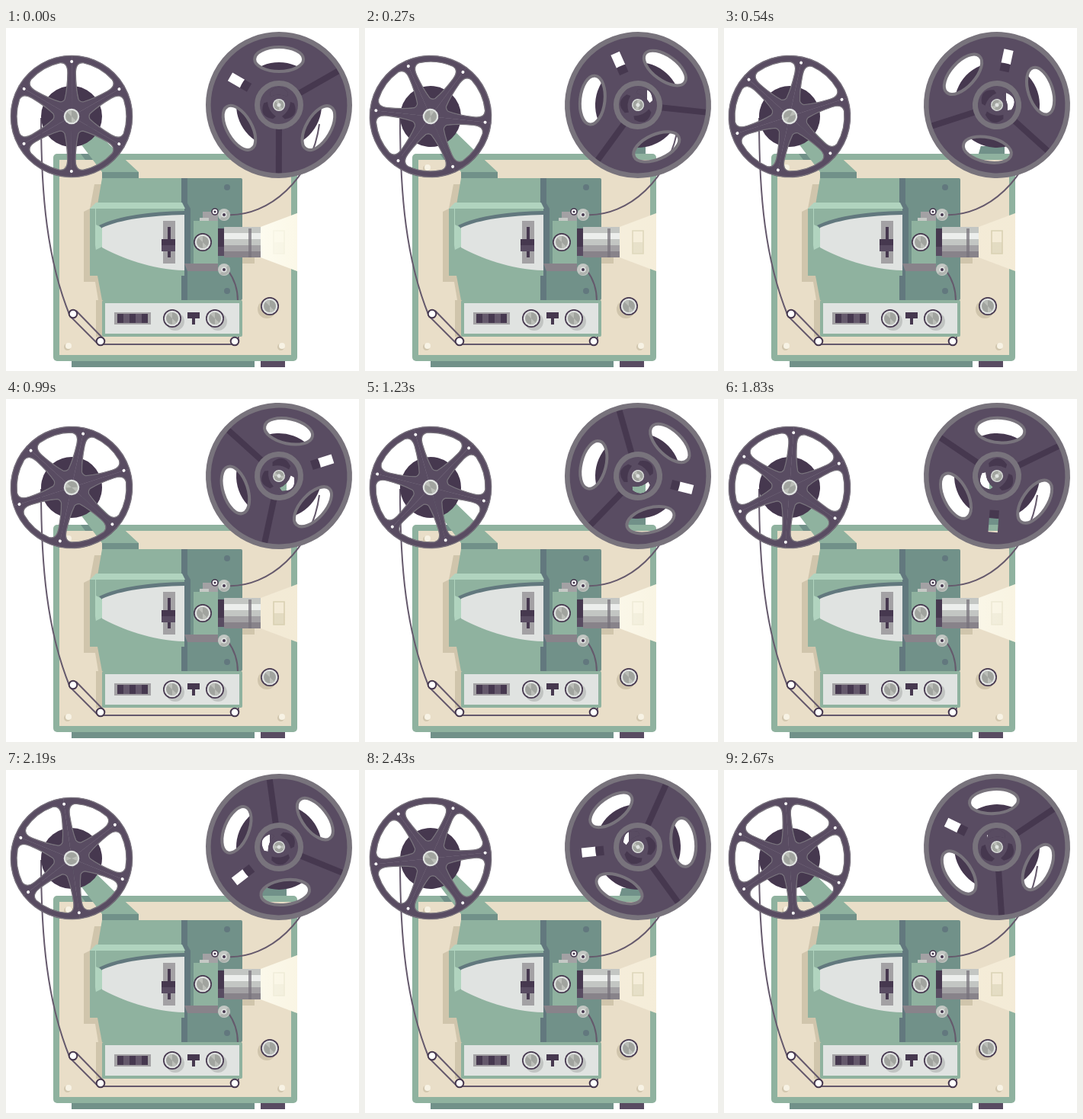
Write an HTML page that moves like this. It is 463 by 450 pixels and loops after 2700 ms.

```html
<!DOCTYPE html>
<html lang="en">
<head>
<meta charset="utf-8">
<title>Film projector</title>
<style>
  html, body { margin: 0; width: 100%; height: 100%; overflow: hidden; background: #fff; }
  svg { display: block; width: 463px; height: 450px; }
</style>
</head>
<body>
<svg id="stage" viewBox="0 0 463 450">
  <defs>
    <linearGradient id="glow">
      <stop offset="0" stop-color="#fffff4"/>
      <stop offset="1" stop-color="#fffef0" stop-opacity=".82"/>
    </linearGradient>
    <g id="face">
      <circle r="9.5" fill="#e0e3e1"/>
      <circle r="8" fill="#a1a49f"/>
      <path d="M0 0L-5.6-5.6A8 8 0 0 1 0-8ZM0 0L5.6 5.6A8 8 0 0 1 0 8Z" fill="#bbbeb8"/>
    </g>
    <g id="knob">
      <circle r="12" fill="#46384f"/>
      <circle r="10.3" fill="#e0e3e1"/>
      <use href="#face"/>
    </g>
    <g id="guide">
      <circle r="8" fill="#c3c7c3"/>
      <path d="M-5.6 5.6A8 8 0 0 0 5.6-5.6Z" fill="#aeb2ae"/>
      <circle r="3.6" fill="#e0e3e1"/>
      <circle r="2" fill="#46384f"/>
    </g>
    <circle id="pin" r="5.3" fill="#fff" stroke="#46384f" stroke-width="2"/>
    <g id="bolt">
      <circle cx="-1.5" cy="1.5" r="4.5" fill="#d1c6ae"/>
      <circle r="4" fill="#f7f2e4"/>
    </g>
  </defs>

  <!-- stand behind the right reel -->
  <path d="M334 165L337 155H348V101H368V165Z" fill="#8fb29f"/>
  <path d="M334 165L337 155H368V165Z" fill="#719189"/>
  <path d="M346 72H370V96H346Z" fill="#594c62"/>

  <!-- case -->
  <path d="M86 436H326V445H86Z" fill="#719189"/>
  <path d="M334 436H366V445H334Z" fill="#594c62"/>
  <rect x="62" y="165" width="320" height="272" rx="5" fill="#8fb29f"/>
  <path d="M70 173H374V429H70Z" fill="#e9dec8"/>
  <use href="#bolt" x="82" y="183"/>
  <use href="#bolt" x="82" y="417"/>
  <use href="#bolt" x="362" y="417"/>

  <!-- housing -->
  <path d="M124 205H116L110 237L102 241V333H117L121 357H118V405H130V205ZM306 301H326V309H306Z" fill="#d0c5ac"/>
  <path d="M98 165H120V173H104Z" fill="#719189"/>
  <path d="M80 128L98 152L126 189H174L146 163L110 128Z" fill="#8fb29f"/>
  <path d="M126 189H174V198H126Z" fill="#719189"/>
  <path d="M126 197H232V357H126L120 325V232Z" fill="#8fb29f"/>
  <rect x="230" y="197" width="80" height="160" rx="2" fill="#719189"/>
  <path d="M230 197H238V230L242 237V319H238V357H230Z" fill="#62787e"/>
  <path d="M110 237L118 229H231L235 237Z" fill="#b1d4bf"/>
  <path d="M110 237H234V325H110Z" fill="#8fb29f"/>
  <path d="M110 237H118V258L126 262V287L118 291V292Z" fill="#b1d4bf"/>
  <path d="M110 237H117V325H110Z" fill="#8fb29f"/>
  <path d="M122 259C148 246 190 241 234 240V248L126 263Z" fill="#62787e"/>
  <path d="M126 262C150 251 190 246 234 245V318C190 317 150 301 126 288Z" fill="#e0e3e1"/>
  <path d="M206 253H222V309H206Z" fill="#a3a1a4"/>
  <path d="M212 261H216V301H212ZM204 277H222V285H204Z" fill="#46384f"/>
  <path d="M204 285H222V293H204Z" fill="#594c62"/>
  <path d="M212 293H216V301H212Z" fill="#46384f"/>
  <path d="M234 309H278V319H238Z" fill="#88838a"/>
  <path d="M258 241H278V253H258Z" fill="#a3a1a4"/>
  <path d="M254 249H266V254H254Z" fill="#c5c9c5"/>
  <path d="M246 253H278V309H246Z" fill="#8fb29f"/>
  <circle cx="290" cy="209" r="4" fill="#62787e"/>
  <circle cx="290" cy="345" r="4" fill="#62787e"/>
  <use href="#knob" x="258" y="281"/>

  <!-- film -->
  <g fill="none" stroke="#65596c" stroke-width="2">
    <path d="M46 118C46 220 54 305 84 378L120 414M92 371L128 408"/>
    <path d="M290 245C345 248 402 197 411 126"/>
    <path d="M291 318C300 330 304 342 304 358"/>
  </g>

  <!-- control panel -->
  <rect x="126" y="357" width="184" height="48" rx="2" fill="#8fb29f"/>
  <path d="M130 361H306V401H130Z" fill="#e0e3e1"/>
  <path d="M142 373H190V389H142Z" fill="#a3a1a4"/>
  <path d="M146 375H186V387H146Z" fill="#46384f"/>
  <path d="M154 375H162V387H154ZM170 375H178V387H170Z" fill="#65596c"/>
  <circle cx="222" cy="385" r="12" fill="#c1c4c2"/>
  <circle cx="278" cy="385" r="12" fill="#c1c4c2"/>
  <use href="#knob" x="218" y="381"/>
  <use href="#knob" x="274" y="381"/>
  <path d="M238 373H254V381H238ZM244 381H248V389H244Z" fill="#46384f"/>
  <circle cx="342" cy="369" r="12" fill="#d0c5ac"/>
  <use href="#knob" x="346" y="365"/>
  <path d="M123 415H300Q304 415 305 405" fill="none" stroke="#65596c" stroke-width="2"/>
  <use href="#pin" x="88" y="375"/>
  <use href="#pin" x="124" y="411"/>
  <use href="#pin" x="300" y="411"/>

  <!-- lens and rollers -->
  <path d="M278 263H286V299H278Z" fill="#46384f"/>
  <path d="M278 287H286V299H278Z" fill="#594c62"/>
  <path d="M286 261H334V301H286Z" fill="#c3c6c3"/>
  <path d="M286 269H334V277H286Z" fill="#eceeec"/>
  <path d="M286 285H334V293H286Z" fill="#a3a1a4"/>
  <path d="M286 293H334V301H286Z" fill="#88838a"/>
  <path d="M318 263H322V301H318Z" fill="#77727b" opacity=".75"/>
  <use href="#guide" x="286" y="245"/>
  <use href="#guide" x="286" y="317"/>
  <circle cx="274" cy="241" r="4" fill="#fff" stroke="#46384f" stroke-width="1.6"/>
  <circle cx="274" cy="241" r="1.6" fill="#46384f"/>

  <!-- beam -->
  <path d="M334 261L382 243V319L334 301Z" fill="#f3ead5"/>
  <path d="M351 281H365V296H351Z" fill="#e2dac0"/>
  <path d="M351 266H365V296H351Z" fill="none" stroke="#d8cfb0" stroke-width="1.6"/>
  <path id="beam" d="M334 261L382 243V319L334 301Z" fill="url(#glow)"/>

  <g id="small"></g>
  <g id="large"></g>
</svg>
<script>
const LOOP = 2700;
const $ = id => document.getElementById(id);
const PURPLE = '#594c62', DARK = '#46384f', GRAY = '#78737c';

const ring = r => `M${-r} 0A${r} ${r} 0 1 1 ${r} 0A${r} ${r} 0 1 1 ${-r} 0Z`;
const turn = (deg, inner) => `<g transform="rotate(${deg})">${inner}</g>`;
const repeat = (n, fn) => Array.from({ length: n }, (_, i) => fn(i)).join('');

// Oval opening at distance 60 from the hub, long side along the rim
function oval(deg) {
  const a = deg * Math.PI / 180, c = Math.cos(a), s = Math.sin(a);
  const end = k => `${(60 * c - k * s).toFixed(2)} ${(60 * s + k * c).toFixed(2)}`;
  const arc = k => `A32 16 ${deg + 90} 1 1 ${end(k)}`;
  return `M${end(-32)}${arc(32)}${arc(-32)}Z`;
}

// Rectangle in polar-aligned axes, turned to 210 degrees
function slot(from, to, half) {
  const a = 210 * Math.PI / 180, c = Math.cos(a), s = Math.sin(a);
  const at = (r, d) => `${(r * c - d * s).toFixed(2)} ${(r * s + d * c).toFixed(2)}`;
  return `M${at(from, -half)}L${at(to, -half)}L${at(to, half)}L${at(from, half)}Z`;
}

function largeReel() {
  const hubHole = 'M-11-11Q0-16 11-11L12-16Q0-31-12-16Z';
  const ovals = [-90, 30, 150].map(oval).join('');
  const grooves = [90, -30].map(d =>
    turn(d, `<path d="M30-4H90V4H30Z" fill="${DARK}"/>`)).join('');
  const lobes = [30, 150].map(d =>
    turn(d + 90, `<path d="${hubHole}" fill="${DARK}"/>`)).join('');
  return `<path d="${ring(56)}${hubHole}" fill="${DARK}" fill-rule="evenodd"/>
    <path d="${ring(94)}${ovals}${slot(45, 74, 6.2)}${hubHole}" fill="${PURPLE}" fill-rule="evenodd"/>
    ${grooves}
    <path d="${ovals}" fill="none" stroke="${GRAY}" stroke-width="4"/>
    <circle r="92.7" fill="none" stroke="${GRAY}" stroke-width="6.6"/>
    <circle r="28.5" fill="none" stroke="${GRAY}" stroke-width="7"/>
    ${lobes}
    <circle r="11" fill="${PURPLE}"/>
    <g transform="scale(.84)"><use href="#face"/></g>
    <circle r="2.5" fill="#e0e3e1"/>`;
}

function smallReel() {
  const gap = 'M24-3.5C34-13 42-18 52-24Q64-31 68.5-22A72 72 0 0 1 68.5 22Q64 31 52 24C42 18 34 13 24 3.5Q22 0 24-3.5Z';
  const clip = `<clipPath id="gap"><path d="${gap}"/></clipPath>`;
  // Each sixth is a wedge with its opening cut out
  const wedge = `M0 0L69.28-40A80 80 0 0 1 69.28 40Z${gap}`;
  const part = i => turn(60 * i, `
    <circle r="40" fill="${DARK}" clip-path="url(#gap)"/>
    <path d="${wedge}" fill="${PURPLE}" stroke="${PURPLE}" stroke-width=".4" fill-rule="evenodd"/>
    <path d="${gap}" fill="none" stroke="${GRAY}" stroke-width="1.2"/>`);
  const dot = i => turn(60 * i, '<circle cy="-72" r="2" fill="#fff"/>');
  return clip + repeat(6, part) + repeat(6, dot) +
    `<circle r="79.4" fill="none" stroke="${GRAY}" stroke-width="1"/>
     <circle r="10.3" fill="#e0e3e1"/><use href="#face"/>`;
}

$('large').innerHTML = largeReel();
$('small').innerHTML = smallReel();

function draw(ms) {
  const p = ms % LOOP / LOOP, deg = 360 * p, a = 2 * Math.PI * p;
  $('small').setAttribute('transform', `translate(86 116) rotate(${deg})`);
  $('large').setAttribute('transform', `translate(358 101) rotate(${deg})`);
  const flicker = (.5 + .5 * Math.cos(37 * a)) * (.8 + .2 * Math.cos(4 * a));
  $('beam').setAttribute('opacity', (.85 * flicker).toFixed(3));
}

const start = performance.now();
function tick() {
  draw(performance.now() - start);
  requestAnimationFrame(tick);
}
draw(0);
requestAnimationFrame(tick);
</script>
</body>
</html>
```
